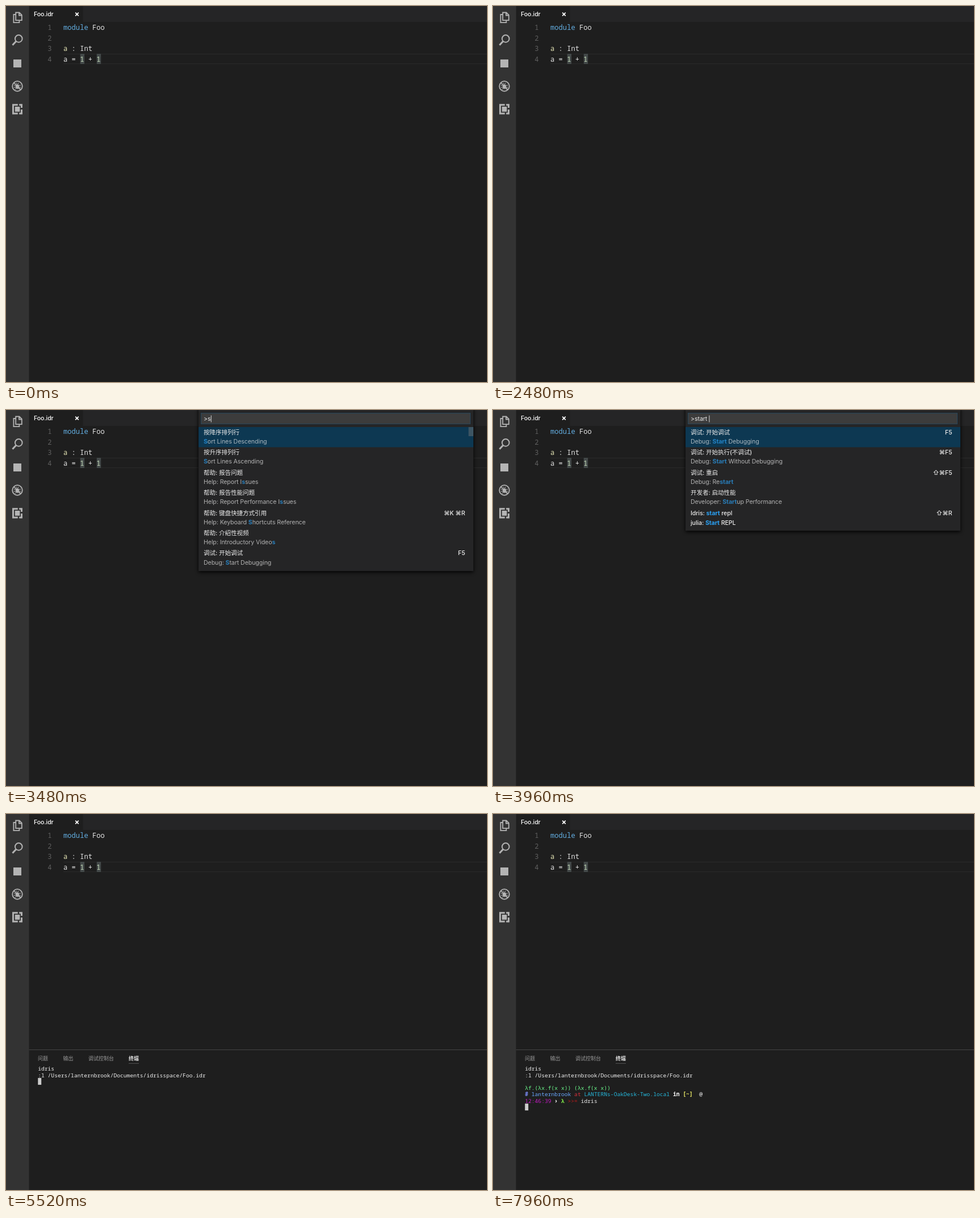
An HTML page that plays this animation: 847x661 px, repeating every 8000 ms.

```html
<!DOCTYPE html>
<html lang="zh-CN">
<head>
<meta charset="utf-8">
<title>Foo.idr</title>
<style>
  html, body { margin: 0; width: 100%; height: 100%; overflow: hidden; background: #1e1e1e; }
  svg { display: block; }
  text { white-space: pre; }
  .ui { font: 10.6px Inter, "Noto Sans CJK SC", "Noto Sans CJK", sans-serif; letter-spacing: -.08px; fill: #ececec; }
  .code { font: 500 12.15px "Noto Sans Mono", "DejaVu Sans Mono", monospace; fill: #e2e2e2; }
  .term { font: 500 9.67px "Noto Sans Mono", "DejaVu Sans Mono", monospace; fill: #f0f0f0; }
  .tab { font: 9px "Noto Sans CJK SC", "Noto Sans CJK", sans-serif; fill: #999; }
  .num { fill: #5f5f5f; text-anchor: end; }
  .key { text-anchor: end; }
  .title { font-weight: 500; }
  .detail { opacity: .7; }
  .hit { fill: #2ba2f5; font-weight: 700; }
  .bold { font-weight: 700; }
  .icon { fill: none; stroke: #b4b4b4; stroke-width: 1.8; }
  .solid { fill: #b4b4b4; stroke: none; }
  #frame { filter: drop-shadow(0 2px 3px #000); }
</style>
</head>
<body>
<svg width="847" height="661" viewBox="0 0 847 661">
  <rect width="847" height="661" fill="#1e1e1e"/>
  <rect x="40" width="807" height="28" fill="#252526"/>
  <rect x="41" width="94.5" height="28" fill="#1e1e1e"/>
  <rect width="40.5" height="661" fill="#333"/>

  <g class="icon">
    <path d="M17.2 11.5h6.3l4.3 4.4v9.3H17.2zM23 11.5v5h5M17 15h-3.6v14.2h10v-3.6"/>
    <circle cx="22.3" cy="57.4" r="6.3" stroke-width="2"/>
    <path d="M17.8 62l-6.3 6.7" stroke-width="3"/>
    <rect class="solid" x="13" y="94" width="14" height="14"/>
    <circle cx="20" cy="141" r="8.8"/>
    <ellipse class="solid" cx="20" cy="141.6" rx="3" ry="4.2"/>
    <path d="M14 139l4 1.5M26 139l-4 1.5M13.8 143h12.4M15.5 147l3-2.5M24.5 147l-3-2.5M18 135l1 2M22 135l-1 2" stroke-width="1"/>
    <path d="M14 135l12 12" stroke-width="1.6"/>
    <path d="M20.8 173.8h-8.3v15.2h8.3M23.2 173.8h4.3v5.2M27.5 182v7h-4.3" stroke-width="2.9"/>
    <rect class="solid" x="15.8" y="177" width="8.6" height="8.8"/>
  </g>

  <text class="ui title" x="49" y="17.8" style="fill:#fff">Foo.idr</text>
  <path d="M122.2 11.7l5.6 5.6m0-5.6l-5.6 5.6" stroke="#fff" stroke-width="1.7"/>

  <path d="M101 84.5H847M101 101.5H847" stroke="#2a2a2a"/>
  <g fill="#434949">
    <rect x="130.7" y="84" width="7.4" height="18"/>
    <rect x="159.8" y="84" width="7.4" height="18"/>
  </g>
  <g id="code" class="code"></g>
  <g id="block">
    <rect x="159.8" y="84" width="7.6" height="18" fill="#b0b1af"/>
    <text class="code" x="159.4" y="97.6" style="fill:#555">1</text>
  </g>

  <g id="panel">
    <path d="M40.5 414.5H847" stroke="#454545"/>
    <text class="tab" x="56" y="433.3">问题</text>
    <text class="tab" x="100.5" y="433.3">输出</text>
    <text class="tab" x="145" y="433.3">调试控制台</text>
    <text class="tab bold" x="216" y="433.3" style="fill:#e7e7e7">终端</text>
    <path d="M216 438.5h18" stroke="#505050"/>
    <g id="term" class="term"></g>
  </g>

  <g id="palette" class="ui">
    <rect id="frame" x="339" y="-6" width="484" fill="#252526"/>
    <rect x="343.5" y="5.5" width="474" height="19" fill="#3c3c3c" stroke="#27465a"/>
    <text id="query" x="348" y="19.2"></text>
    <rect id="caret" y="9.5" width="1" height="12" fill="#d8d8d8"/>
    <g id="list"></g>
  </g>
</svg>
<script>
const LOOP = 8000, UNIT = 17.72, MAX_ROWS = 7;
const OPEN = 2840, CLOSE = 5200, PANEL = 5300, LOADED = 5450, PROMPT = 7100;
const BLINKS = [[960, 1470], [1960, 2480]];
const KEYS = [[3400, 's'], [3500, 't'], [3600, 'a'], [3700, 'r'], [3800, 't'], [3920, ' '],
              [4080, 'r'], [4230, 'e'], [4390, 'p'], [4560, 'l']];

// [title, detail, shortcut]; a row without detail is half as tall
const COMMANDS = [
  ['按降序排列行', 'Sort Lines Descending'],
  ['按升序排列行', 'Sort Lines Ascending'],
  ['帮助: 报告问题', 'Help: Report Issues'],
  ['帮助: 报告性能问题', 'Help: Report Performance Issues'],
  ['帮助: 键盘快捷方式引用', 'Help: Keyboard Shortcuts Reference', '⌘K ⌘R'],
  ['帮助: 交互式运动场', 'Help: Interactive Playground'],
  ['帮助: 介绍性视频', 'Help: Introductory Videos'],
  ['调试: 开始调试', 'Debug: Start Debugging', 'F5'],
  ['调试: 开始执行(不调试)', 'Debug: Start Without Debugging', '⌘F5'],
  ['调试: 重启', 'Debug: Restart', '⇧⌘F5'],
  ['开发者: 启动性能', 'Developer: Startup Performance'],
  ['Idris: start repl', '', '⇧⌘R'],
  ['julia: Start REPL', '']
];

const CODE = [
  [['module', '#62ade0'], [' Foo']],
  [],
  [['a', '#e4e4b4'], [' : Int']],
  [['a = '], ['1', '#c4dab8'], [' + '], ['1', '#c4dab8']]
];

const LOAD_LINES = [
  [['idris']],
  [[':l /Users/lanternbrook/Documents/idrisspace/Foo.idr']]
];
const PROMPT_LINES = [
  [],
  [['λf.(λx.f(x x)) (λx.f(x x))', '#6af58a']],
  [['# ', '#7f8fff', 1], ['lanternbrook', '#6aa8ff'], [' at ', '#d8303c'],
   ['LANTERNs-OakDesk-Two.local', '#25b8dc'], [' in ', '#fff', 1],
   ['[~]', '#f5f56a', 1], ['  @', '#fff']],
  [['12:46:39', '#c41ac4'], [' › ', '#fff', 1], ['λ', '#84f04a', 1],
   [' >>= ', '#c01c1c'], ['idris']]
];

const $ = id => document.getElementById(id);
const show = (id, on) => { $(id).style.display = on ? '' : 'none'; };
const esc = s => s.replace(/&/g, '&amp;').replace(/</g, '&lt;').replace(/>/g, '&gt;');
const label = (x, y, body, cls = '') => `<text class="${cls}" x="${x}" y="${y}">${body}</text>`;
const spans = parts => parts.map(([s, color, bold]) =>
  `<tspan class="${bold ? 'bold' : ''}"${color ? ` style="fill:${color}"` : ''}>${esc(s)}</tspan>`).join('');

const find = (s, q) => s.toLowerCase().indexOf(q);
function mark(s, q) {
  const i = q ? find(s, q) : -1;
  if (i < 0) return esc(s);
  const end = i + q.length;
  return `${esc(s.slice(0, i))}<tspan class="hit">${esc(s.slice(i, end))}</tspan>${esc(s.slice(end))}`;
}

$('code').innerHTML = CODE.map((parts, i) => {
  const y = 42 + i * 18.53;
  return label(80.5, y, i + 1, 'num') + label(101, y, spans(parts));
}).join('');

function drawTerminal(lines) {
  const y = i => 451.4 + i * 11.27;
  $('term').innerHTML = lines.map((parts, i) => label(56.2, y(i), spans(parts))).join('') +
    `<rect x="56.3" y="${y(lines.length) - 9.9}" width="5.9" height="12" fill="#cccccc"/>`;
}

function drawPalette(typed) {
  const q = typed.trim();
  const found = COMMANDS.filter(([title, detail]) => find(detail || title, q) >= 0);
  let y = 30, out = '';
  found.slice(0, MAX_ROWS).forEach(([title, detail, key], i) => {
    const h = detail ? 2 * UNIT : UNIT;
    if (!i) out += `<rect x="339" y="${y}" width="484" height="${h}" fill="#0d3852"/>`;
    out += label(348, y + 12.8, detail ? esc(title) : mark(title, q), 'title');
    if (detail) out += label(348, y + 28.9, mark(detail, q), 'detail');
    if (key) out += label(808.5, y + 12.8, key, 'key title');
    y += h;
  });
  if (found.length > MAX_ROWS)
    out += '<rect x="814.5" y="30" width="8.5" height="16" fill="#797979" opacity=".45"/>';
  $('list').innerHTML = out;
  $('frame').setAttribute('height', y + 11);
  $('query').textContent = '>' + typed;
  $('caret').setAttribute('x', 348.3 + $('query').getComputedTextLength());
}

let lastTyped = null, lastStage = null;
function render(t) {
  show('block', BLINKS.some(([a, b]) => t >= a && t < b));

  const open = t >= OPEN && t < CLOSE;
  show('palette', open);
  if (open) {
    const keys = KEYS.filter(k => k[0] <= t);
    const typed = keys.map(k => k[1]).join('');
    if (typed !== lastTyped) drawPalette(lastTyped = typed);
    const since = t - (keys.length ? keys[keys.length - 1][0] : OPEN);
    show('caret', since % 1000 < 500);
  }

  show('panel', t >= PANEL);
  const stage = (t >= LOADED) + (t >= PROMPT);
  if (stage !== lastStage) {
    lastStage = stage;
    drawTerminal([[], LOAD_LINES, [...LOAD_LINES, ...PROMPT_LINES]][stage]);
  }
}

const start = performance.now();
function tick() {
  render((performance.now() - start) % LOOP);
  requestAnimationFrame(tick);
}
tick();
</script>
</body>
</html>
```
